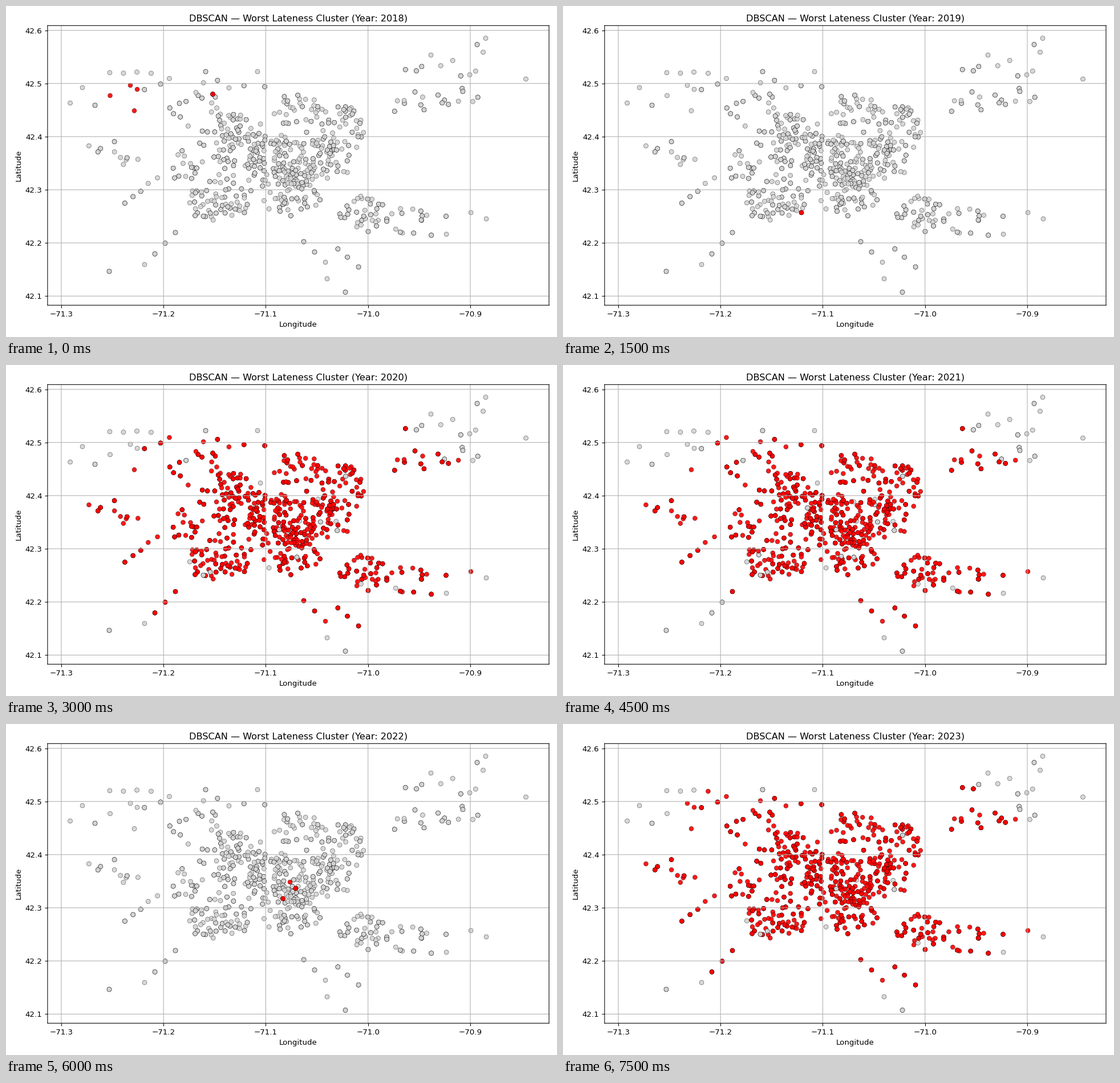
These frames come from a looping animation (966x580 px, 8 s). A matplotlib script:

```python
import numpy as np
import matplotlib.pyplot as plt
from matplotlib.animation import FuncAnimation
from matplotlib.ticker import MultipleLocator

W, H, DPI = 966, 580, 96.6
LEFT, RIGHT, TOP, BOTTOM = 72.9, 952.0, 34.3, 524.3
FIRST_YEAR, FRAME_MS, FRAMES, FRAMES_PER_YEAR = 2018, 500, 16, 3

plt.rcParams["path.snap"] = False
rng = np.random.default_rng(18)

# Dense districts: centre x, y, radius x, y, number of stops (stage pixels)
DISTRICTS = [
    (410, 235, 60, 46, 72), (375, 285, 85, 55, 52), (480, 275, 60, 50, 92),
    (508, 298, 38, 28, 46), (560, 268, 50, 42, 52), (580, 215, 58, 42, 46),
    (515, 185, 45, 38, 28), (372, 348, 56, 30, 54), (500, 338, 52, 30, 36),
    (627, 364, 45, 32, 40), (700, 375, 40, 25, 10), (340, 185, 55, 35, 18),
]

# Routes with evenly spaced stops: start, end, number of stops, jitter
ROUTES = [
    ((243, 453), (297, 397), 4, 0), ((522, 413), (560, 449), 3, 0),
    ((581, 425), (619, 457), 3, 1), ((691, 396), (771, 401), 4, 2),
    ((728, 375), (815, 362), 3, 0), ((681, 176), (827, 156), 17, 8),
    ((704, 114), (780, 98), 5, 5), ((798, 124), (824, 115), 3, 1),
    ((343, 136), (452, 140), 5, 4), ((182, 119), (255, 117), 4, 1),
    ((246, 149), (285, 134), 3, 4), ((162, 250), (226, 275), 10, 10),
    ((208, 346), (264, 301), 5, 1),
]

# Far stops that never join a cluster
REMOTE = [(112.5, 170), (134, 143), (156, 174), (350, 115), (441, 115),
          (745, 86), (826, 67.5), (841, 56.5), (836.5, 81), (911.5, 128),
          (842, 373), (595, 501.5), (181, 465), (563, 478)]

# Years with a small cluster, and years with a city-wide one
HOT = {0: [(182.5, 157), (218, 139), (230, 146), (225, 183.5), (362.5, 154.5)],
       1: [(418, 362)],
       4: [(498, 277), (485.5, 306), (508, 288)]}
REACH = {2: 1.2, 3: 1.17, 5: 1.25}
STRAYS = {2: 0.04, 3: 0.05, 5: 0.02}


def far_enough(p, points, gap=3.5):
    return all(np.hypot(p[0] - q[0], p[1] - q[1]) > gap for q in points)


def district(cx, cy, rx, ry, count):
    angle = rng.uniform(0, 2 * np.pi, count)
    r = rng.uniform(size=count) ** 0.55
    return zip(cx + rx * r * np.cos(angle), cy + ry * r * np.sin(angle))


def route(start, end, count, jitter):
    return np.linspace(start, end, count) + rng.normal(0, 1, (count, 2)) * jitter


hot = [(p, year) for year, group in HOT.items() for p in group]
hot_points = [p for p, _ in hot]
stops = []
for d in DISTRICTS:
    for p in district(*d):
        if far_enough(p, stops + hot_points):
            stops.append(p)
for r in ROUTES:
    stops.extend(route(*r))
n_joining = len(stops) + len(hot)
xy = np.array(stops + hot_points + REMOTE)
n = len(xy)

hot_year = np.full(n, -1)
hot_year[len(stops):n_joining] = [year for _, year in hot]
distance = np.hypot((xy[:, 0] - 500) / 300, (xy[:, 1] - 280) / 170)
distance += rng.normal(0, 0.06, n)
distance[n_joining:] = np.inf
luck = rng.uniform(size=n)

# Stops listed several times look darker because the markers are translucent
order = np.repeat(np.arange(n), rng.choice([1, 3], n))


def to_lon(x):
    return -71.3 + (x - 96.9) / 1792.6


def to_lat(y):
    return 42.6 - (y - 42.6) / 931.4


fig = plt.figure(figsize=((W + 0.01) / DPI, (H + 0.01) / DPI), dpi=DPI,
                 facecolor="white")
ax = fig.add_axes([LEFT / W, 1 - BOTTOM / H, (RIGHT - LEFT) / W,
                   (BOTTOM - TOP) / H])
ax.set_xlim(to_lon(LEFT), to_lon(RIGHT))
ax.set_ylim(to_lat(BOTTOM), to_lat(TOP))
ax.xaxis.set_major_locator(MultipleLocator(0.1))
ax.yaxis.set_major_locator(MultipleLocator(0.1))
ax.set_xlabel("Longitude")
ax.set_ylabel("Latitude")
ax.grid(True)
title = ax.set_title("")
dots = ax.scatter(to_lon(xy[order, 0]), to_lat(xy[order, 1]), s=35,
                  linewidths=0.3, edgecolors="black", alpha=0.9)


def draw(frame):
    year = frame // FRAMES_PER_YEAR
    in_cluster = hot_year == year
    if year in REACH:
        in_cluster = (distance < REACH[year]) & (luck > STRAYS[year])
    dots.set_facecolor(np.where(in_cluster, "red", "lightgray")[order])
    title.set_text("DBSCAN — Worst Lateness Cluster "
                   f"(Year: {FIRST_YEAR + year})")
    return dots, title


anim = FuncAnimation(fig, draw, frames=FRAMES, interval=FRAME_MS,
                     init_func=lambda: draw(0), repeat=True, repeat_delay=0,
                     blit=False)
plt.show()
```
